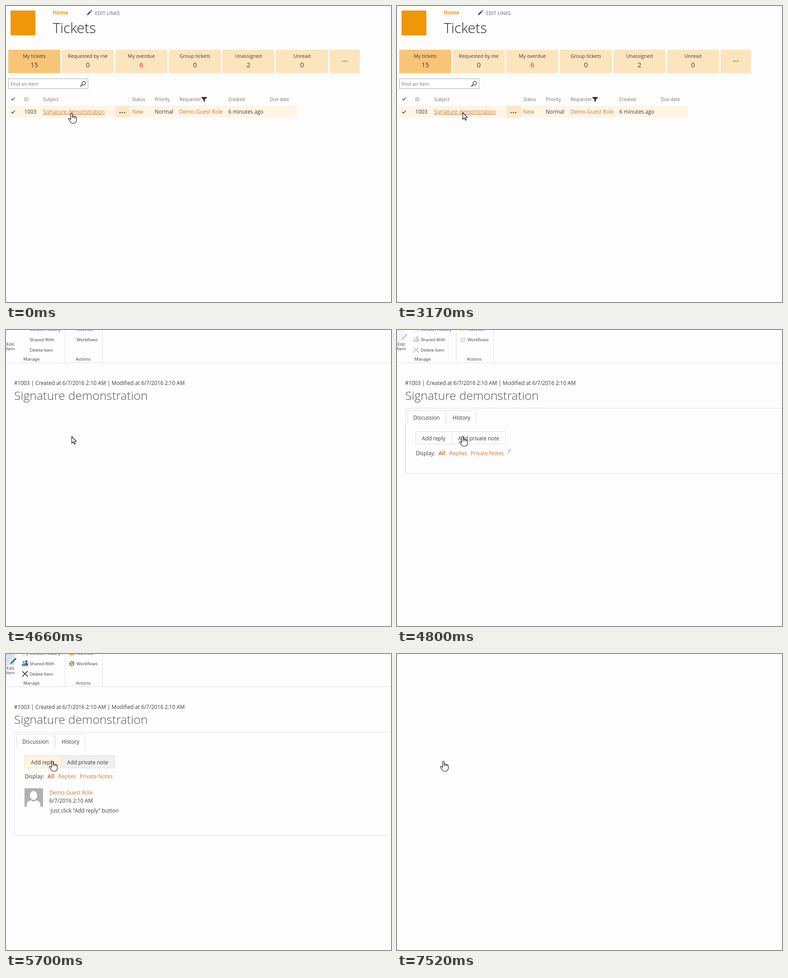
Animation, 852 px wide and 657 px high, one loop 8000 ms. Source, as an HTML page:

```html
<!DOCTYPE html>
<html lang="en">
<head>
<meta charset="utf-8">
<title>Tickets</title>
<style>
html, body { margin: 0; width: 852px; height: 657px; overflow: hidden; background: #fdfdfd }
svg { display: block }
text { font: 11.75px "Open Sans", "Noto Sans", sans-serif; fill: #3c3c3c }
.mid { text-anchor: middle }
.tile { font-size: 10.9px }
.count { font-size: 15px }
.head text { font-size: 10px; fill: #727272 }
.ribbon text { font-size: 9.65px }
.link text, text.link { fill: #cb7a35 }
text.light { font-weight: 300; fill: #555 }
.rule, .btn { fill: none; stroke: #dedede }
.btn.hover { fill: #fff4e1; stroke: #f9d9a4 }
.btn.grey { fill: #f0f0f0 }
#subject { text-decoration: underline 1px; text-underline-offset: 1px }
#subject.active { fill: #a4591b }
#cursor path { stroke: #15151f; stroke-width: 1.2; fill: #fff; stroke-linejoin: round }
</style>
</head>
<body>
<svg width="852" height="657">
  <g id="list">
    <rect x="10" y="10" width="55" height="55" fill="#f09609"/>
    <text x="103.500" y="19" style="font-size:11.6px;font-weight:700;fill:#f09a1c">Home</text>
    <path d="M179 20.500l1-3.500 6-6 2.500 2.500-6 6zM187 10l1-1q1-.5 2 .5t.5 2l-1 1z" fill="#555"/>
    <text x="197" y="20" style="font-size:10.8px;fill:#666">EDIT LINKS</text>
    <text x="103.500" y="60" class="light" style="font-size:31.4px;fill:#262626">Tickets</text>
    <g id="tiles"></g>
    <rect x="5.500" y="161.500" width="176" height="22" fill="#fff" stroke="#ababab"/>
    <text x="10" y="177" style="font-size:10.7px;fill:#777">Find an item</text>
    <path d="M169 174.500l-4.500 4" stroke="#444" stroke-width="2"/>
    <circle cx="172" cy="171.500" r="3.900" fill="none" stroke="#444" stroke-width="1.500"/>
    <g class="head">
      <text x="40" y="211">ID</text>
      <text x="82" y="211">Subject</text>
      <text x="279" y="211">Status</text>
      <text x="329" y="211">Priority</text>
      <text x="384" y="211">Requester</text>
      <text x="492" y="211">Created</text>
      <text x="584" y="211">Due date</text>
    </g>
    <path d="M432.500 202h12v1.500l-4.500 4.500v4h-3v-4l-4.500-4.500z" fill="#333"/>
    <path d="M5 221h639v27H5z" fill="#fef5e6"/>
    <path d="M242 221h32v27h-32z" fill="#fce8c9"/>
    <path d="M11.500 206l3 3 5-6M11.500 235l3 3 5-6" fill="none" stroke="#555" stroke-width="1.700"/>
    <path d="M251 236.500h3m2 0h3m2 0h3" stroke="#444" stroke-width="2.200"/>
    <text x="40.500" y="239">1003</text>
    <text x="82" y="239" class="link" id="subject">Signature demonstration</text>
    <text x="279" y="239" class="link">New</text>
    <text x="329" y="239">Normal</text>
    <text x="383.500" y="239" class="link">Demo-Guest Role</text>
    <text x="492" y="239">6 minutes ago</text>
  </g>

  <g id="ticket">
    <g class="ribbon">
      <path class="rule" d="M0 72.500h852M131 0v72M213.500 0v72"/>
      <g id="icons" fill="none">
        <path d="M-1 22.500h18.500V0" stroke="#9aa5b1"/>
        <path d="M0 2.500h15M0 6.500h15M0 10.500h14M0 14.500h10M0 18.500h7" stroke="#6f93bd"/>
        <path d="M8 23.500l2-5L20.500 8l3 3L13 21.500z" fill="#2f74b0" stroke="#fff" stroke-width=".6"/>
        <path d="M38 0v4h4" stroke="#bbb"/>
        <path d="M44 1.500q3 2 4-1.500M46.500 2.500l2 2" stroke="#d99b62" stroke-width="1.400"/>
        <path d="M139.500 0h12v2h-12zM144 3h4v1.500h-4z" fill="#eba03c"/>
        <circle cx="45" cy="16.500" r="2.600" fill="#2b5f9c"/>
        <path d="M41 25v-2q0-3.500 4-3.500t4 3.500v2z" fill="#2b5f9c"/>
        <circle cx="39" cy="18" r="2.400" fill="#6da0d4"/>
        <path d="M35 27v-2.500q0-3.500 4-3.500t4 3.500V27z" fill="#5a92cb"/>
        <path d="M43 26.500h6" stroke="#e59a3b" stroke-width="2"/>
        <path d="M36 38.500l12.500 11.500M48 38L36 50" stroke="#4a4a4a" stroke-width="1.900"/>
        <circle cx="145.500" cy="21.500" r="4.700" stroke="#555" stroke-width="1.500"/>
        <path d="M143 20.500l2.500 2.500 5-6.500" stroke="#d65532" stroke-width="1.800"/>
      </g>
      <text x="9.500" y="35" class="mid">Edit</text>
      <text x="9.500" y="45" class="mid">Item</text>
      <text x="52.500" y="2">Version History</text>
      <text x="52.500" y="25">Shared With</text>
      <text x="52.500" y="48">Delete Item</text>
      <text x="156" y="2">Alert Me</text>
      <text x="156" y="25">Workflows</text>
      <text x="56.500" y="68" class="mid">Manage</text>
      <text x="171" y="68" class="mid">Actions</text>
    </g>
    <text x="18" y="122">#1003 | Created at 6/7/2016 2:10 AM | Modified at 6/7/2016 2:10 AM</text>
    <text x="18" y="155" class="light" style="font-size:26.5px">Signature demonstration</text>
    <g id="panel">
      <rect id="frame" class="rule" x="18.500" y="173.500" width="840"/>
      <path class="rule" d="M23.500 208.500v-30h83v30M109.500 208.500v-30h65.500v30"/>
      <text x="36" y="199">Discussion</text>
      <text x="123" y="199">History</text>
      <rect id="note" class="btn" x="121.500" y="225.500" width="119" height="27.500"/>
      <rect id="reply" class="btn" x="41.500" y="225.500" width="80" height="27.500"/>
      <text x="55" y="245">Add reply</text>
      <text x="135" y="245">Add private note</text>
      <g id="filter">
        <text x="41.500" y="276">Display:</text>
        <g class="link">
          <text x="92" y="276" style="font-weight:700">All</text>
          <text x="116" y="276">Replies</text>
          <text x="163" y="276">Private Notes</text>
        </g>
      </g>
      <g id="spinner" fill="#444">
        <circle cx="250.500" cy="266" r="1"/>
        <circle cx="247.500" cy="269" r="1"/>
        <circle cx="247" cy="272.500" r=".8"/>
        <circle cx="250" cy="270" r=".5"/>
      </g>
      <g id="message">
        <path d="M41 298h41v41H41z" fill="#b1b1b1"/>
        <path d="M46 339v-6q1-6 9-8 6 4.500 12 0 8 2 9 8v6z" fill="#fdfdfd"/>
        <ellipse cx="61" cy="314" rx="8" ry="10" fill="#fdfdfd"/>
        <text x="96" y="312" class="link">Demo-Guest Role</text>
        <text x="96" y="330">6/7/2016 2:10 AM</text>
        <text x="98.500" y="352">Just click "Add reply" button</text>
      </g>
    </g>
  </g>

  <circle id="click" r="9.500" fill="#f5b640" fill-opacity=".4"/>
  <g id="cursor">
    <path id="arrow" d="M.5.5V15.500L4 12.200l2.400 5.500 2.200-1-2.400-5.200H11z"/>
    <g id="hand">
      <path d="M-1.700 14V2a1.800 1.800 0 0 1 3.600 0V6.300q3-1 3.200.8 2.800-.8 3.100 1 2.700-.4 2.800 1.800V15q0 7.500-7.500 7.500-4 0-6-3.500l-3.500-5q-1.200-2 .5-2.600 1.500-.4 3.800 2.600z"/>
      <path d="M1.900 6v5M5.100 7v4M8.200 8v3"/>
    </g>
  </g>
</svg>
<script>
const $ = id => document.getElementById(id);
const show = (id, on) => $(id).style.display = on ? '' : 'none';
const within = (t, from, to) => t >= from && t < to;

const tiles = [['My tickets', 15], ['Requested by me', 0], ['My overdue', 6],
  ['Group tickets', 0], ['Unassigned', 2], ['Unread', 0]];
$('tiles').innerHTML = tiles.map(([label, count], i) => {
  const x = 5 + i * 118.5, mid = x + 57.5;
  return `<rect x="${x}" y="97" width="115" height="52" fill="${i ? '#fce4bd' : '#f8c578'}"/>
    <text class="mid tile" x="${mid}" y="115">${label}</text>
    <text class="mid count" x="${mid}" y="136"${i == 2 ? ' style="fill:#e3262b"' : ''}>${count}</text>`;
}).join('') + `<rect x="716" y="97" width="67" height="52" fill="#fce4bd"/>
  <path d="M744.5 122.500h2m2.500 0h2m2.500 0h2" stroke="#444" stroke-width="2"/>`;

// start time, pointer shape, hotspot
const moves = [[0, 'hand', 145, 238], [150, 'hand', 145, 236], [3170, 'arrow', 145, 236],
  [4800, 'hand', 145, 236], [5190, 'hand', 133, 228], [5310, 'hand', 121, 232],
  [5430, 'hand', 112, 236], [5580, 'hand', 106, 237], [5700, 'hand', 102.5, 238]];

function draw(t) {
  const [, shape, x, y] = moves.findLast(m => t >= m[0]);
  $('cursor').setAttribute('transform', `translate(${x} ${y})`);
  show('hand', shape == 'hand');
  show('arrow', shape == 'arrow');

  const opening = within(t, 1360, 1490);
  show('click', opening || within(t, 6690, 6840));
  $('click').setAttribute('cx', x + .5);
  $('click').setAttribute('cy', y + 1);
  $('subject').classList.toggle('active', opening);

  show('list', t < 3970);
  show('ticket', within(t, 4660, 7520));
  show('panel', t >= 4800);
  $('icons').style.opacity = t < 4800 ? 0 : t < 4920 ? .3 : t < 5040 ? .65 : 1;

  const loaded = t >= 5190, onReply = t >= 5310;
  $('frame').setAttribute('height', loaded ? 229 : 145);
  $('filter').setAttribute('transform', `translate(0 ${loaded ? 0 : 2})`);
  show('spinner', !loaded);
  $('spinner').setAttribute('transform', `rotate(${Math.floor((t - 4800) / 120) * 90} 250.5 270)`);
  show('message', loaded);
  $('note').classList.toggle('hover', loaded && !onReply);
  $('note').classList.toggle('grey', onReply);
  $('reply').classList.toggle('hover', onReply);
}

const start = performance.now();
(function tick() {
  draw((performance.now() - start) % 8000);
  requestAnimationFrame(tick);
})();
</script>
</body>
</html>
```
